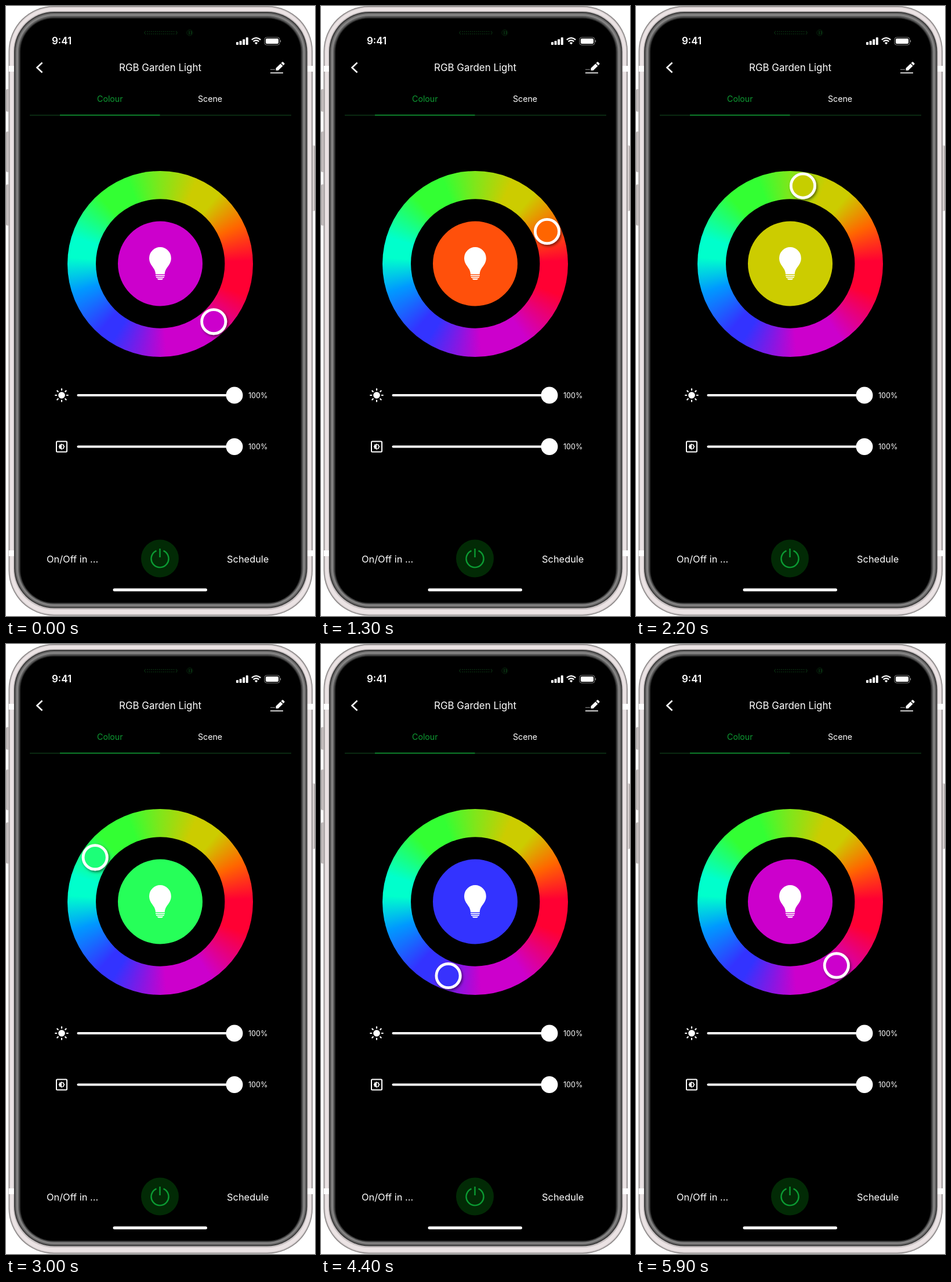
An HTML page for the animation above (6000 ms loop, 533 by 1050 pixels).

```html
<!DOCTYPE html>
<html lang="en">
<head>
<meta charset="utf-8">
<title>Light control</title>
<style>
  html, body { margin: 0; width: 100%; height: 100%; overflow: hidden; background: #fff; }
  svg { display: block; width: 533px; height: 1050px; font-family: Inter, Roboto, sans-serif; }
  .wheel {
    width: 320px; height: 320px; border-radius: 50%;
    background: conic-gradient(#80e61a 0deg, #cc0 24deg, #cc0 40deg, #f60 64deg, #f03 88deg, #f03 110deg,
      #c0c 146deg, #c0c 176deg, #33f 212deg, #33f 222deg, #09f 252deg, #0fc 274deg, #0fc 287deg,
      #3f3 318deg, #3f3 339deg, #80e61a 360deg);
  }
</style>
</head>
<body>
<svg viewBox="0 0 533 1050" xmlns="http://www.w3.org/2000/svg">
  <defs>
    <filter id="shadow" x="-30%" y="-30%" width="170%" height="170%">
      <feDropShadow dx="2" dy="2.5" stdDeviation="2" flood-color="#000" flood-opacity=".5"/>
    </filter>
    <linearGradient id="button" x2="1" y2="0">
      <stop offset="0" stop-color="#8f8a8a"/><stop offset=".5" stop-color="#e6dfdf"/><stop offset="1" stop-color="#a8a2a2"/>
    </linearGradient>
  </defs>

  <g fill="url(#button)">
    <rect x="0.5" y="143" width="7" height="39" rx="2"/>
    <rect x="0.5" y="216" width="7" height="70" rx="2"/>
    <rect x="0.5" y="307" width="7" height="71" rx="2"/>
    <rect x="526" y="240" width="7" height="113" rx="2"/>
  </g>
  <g id="body"></g>
  <g fill="#fff">
    <rect x="5" y="103" width="8.5" height="10"/><rect x="520.5" y="103" width="8.5" height="10"/>
    <rect x="5" y="937" width="8.5" height="10"/><rect x="520.5" y="937" width="8.5" height="10"/>
  </g>

  <g fill="none" stroke="#0d3f17">
    <path d="M241 43Q237 46 241 49M293 43Q297 46 293 49"/>
    <path d="M243 44H291M243 48H291" stroke-dasharray="2 1.5"/>
    <circle cx="317" cy="46" r="5" stroke="#08290d"/>
    <path d="M316 43V49M319 43Q321 46 319 49" stroke="#105a20"/>
  </g>

  <g fill="#fff">
    <text x="79" y="66.3" font-size="17" font-weight="600">9:41</text>
    <rect x="397" y="62" width="4" height="5" rx="1"/>
    <rect x="402.6" y="60" width="4" height="7" rx="1"/>
    <rect x="408.2" y="57.3" width="4" height="9.7" rx="1"/>
    <rect x="413.8" y="54" width="4" height="13" rx="1"/>
    <rect x="448" y="56" width="22" height="9" rx="2"/>
    <path d="M473 58.5Q475.5 60.5 473 62.5Z" opacity=".6"/>
    <path d="M428.8 63.4Q431.5 61.3 434.2 63.4L431.5 66.2Z"/>
  </g>
  <rect x="446" y="54" width="26" height="13" rx="3.5" fill="none" stroke="#8a8a8a"/>
  <g fill="none" stroke="#fff" stroke-width="2.2">
    <path d="M423.8 58.2Q431.5 51.5 439.2 58.2M426.6 61.2Q431.5 57 436.4 61.2"/>
    <path d="M62.5 97.5L53.5 106L62.5 114.5" stroke-width="2.6"/>
    <path d="M456 115.2H478" stroke-width="1.6"/>
    <path d="M456 109.3H464" stroke="#999" stroke-width="1"/>
  </g>
  <path d="M465.5 111V107L473.5 99.2L477.5 103.2L469.5 111ZM474.5 98.2L476.4 96.4Q477.2 95.6 478 96.4L480.3 98.7Q481 99.5 480.3 100.3L478.5 102.2Z" fill="#fff"/>

  <text x="266" y="112.2" font-size="16.9" text-anchor="middle" fill="#fff">RGB Garden Light</text>
  <text x="179.3" y="164.8" font-size="14.2" text-anchor="middle" fill="#0e9c33">Colour</text>
  <text x="352" y="164.8" font-size="14.2" text-anchor="middle" fill="#fff">Scene</text>
  <path d="M41 188H492" stroke="#145222"/>
  <path d="M93 187.7H265.5" stroke="#0f9a33" stroke-width="1.6"/>

  <foreignObject x="106.2" y="283.5" width="320" height="320"><div xmlns="http://www.w3.org/1999/xhtml" class="wheel"></div></foreignObject>
  <circle cx="266.2" cy="443.5" r="111.2"/>
  <circle id="lamp" cx="266" cy="443.5" r="73"/>
  <g fill="#fff">
    <path d="M258 461.8C257.5 449.5 247 447 247 434A18.9 18.9 0 0 1 284.8 434C284.8 447 274.3 449.5 273.8 461.8Z"/>
    <path d="M258 463.2H273.8V465H258ZM258.6 466.2H273.2L272.4 468H259.4ZM260.6 469.1H271.2L269.2 471.2H262.6Z"/>
  </g>
  <circle id="handle" r="20.6" stroke="#fff" stroke-width="4.8" filter="url(#shadow)"/>

  <g id="sliders" fill="#fff"></g>
  <g id="icons" fill="none" stroke="#fff" stroke-linecap="round"></g>
  <rect x="87" y="749.5" width="18" height="18" rx="1.5" fill="none" stroke="#fff" stroke-width="2"/>
  <path d="M96 753.2L98 754.7H100V756.6L101.4 758.5L100 760.4V762.3H98L96 763.8L94 762.3H92V760.4L90.6 758.5L92 756.6V754.7H94Z" fill="#fff"/>
  <path d="M96 755.4A3.1 3.1 0 0 1 96 761.6Z" fill="#000"/>

  <g font-size="16.4" fill="#fff">
    <text x="70" y="958">On/Off in ...</text>
    <text x="381" y="958">Schedule</text>
  </g>
  <circle cx="265.5" cy="951" r="32.5" fill="#022a05"/>
  <path d="M259.5 937.6A15 15 0 1 0 271.5 937.6M265.5 934V949" fill="none" stroke="#0b9a32" stroke-width="2.4"/>
  <rect x="184.5" y="1002.5" width="162.5" height="5" rx="2.5" fill="#fff"/>
</svg>

<script>
  const LOOP = 6000, STEP = 100;
  const $ = id => document.getElementById(id);

  function add(parent, tag, attrs, text) {
    const el = document.createElementNS("http://www.w3.org/2000/svg", tag);
    for (const k in attrs) el.setAttribute(k, attrs[k]);
    if (text) el.textContent = text;
    $(parent).append(el);
  }

  // Phone shell, outside in: side inset, top, bottom, radius, colour
  [[4.5, 0, 1049.5, 78, "#8d8989"], [6, 1.5, 1048, 77, "#d3cccd"], [7.5, 3, 1046.5, 75, "#ebe3e4"],
   [12.5, 8.5, 1039, 70, "#c9c2c3"], [14, 10, 1036.5, 69, "#3a3a3a"], [16, 12, 1034.5, 67, "#6a6969"],
   [18, 14, 1032.5, 65, "#858484"], [21, 17, 1030, 62, "#5a5a5a"], [23, 19.5, 1028.5, 60, "#2a2a2a"],
   [25, 21.5, 1027, 57, "#000"]]
    .forEach(([x, y, bottom, rx, fill]) =>
      add("body", "rect", { x, y, width: 533.5 - 2 * x, height: bottom - y, rx, fill }));

  for (const y of [670, 758.5]) {
    add("sliders", "rect", { x: 122.5, y: y - 2, width: 272, height: 4, rx: 2 });
    add("sliders", "circle", { cx: 394, cy: y, r: 14.5 });
    add("sliders", "text", { x: 418, y: y + 4.8, "font-size": 12.6 }, "100%");
  }

  add("icons", "circle", { cx: 96, cy: 670, r: 5.8, fill: "#fff", stroke: "none" });
  for (let i = 0; i < 8; i++)
    add("icons", "path", { d: "M8.8 0H10.8", "stroke-width": 2.2, transform: `translate(96 670) rotate(${i * 45})` });

  // Handle travel: time in ms, degrees turned, speed in degrees per second
  const travel = [[0, 0, 51], [1300, 71.3, 58], [2200, 127.9, 72], [3000, 193, 81],
                  [4400, 297.2, 59], [5200, 334.2, 36], [5900, 353.2, 20]];

  const tints = [[0, 204, 0, 204], [200, 204, 0, 204], [850, 255, 0, 51], [1425, 255, 102, 0],
                 [2000, 204, 204, 0], [2300, 204, 204, 0], [2850, 51, 255, 51], [3450, 0, 255, 204],
                 [3850, 0, 153, 255], [4250, 51, 51, 255], [4500, 51, 51, 255], [5100, 204, 0, 204],
                 [6200, 204, 0, 204]];

  function span(keys, t) {
    let i = 0;
    while (i < keys.length - 2 && t >= keys[i + 1][0]) i++;
    const a = keys[i], b = keys[i + 1];
    return [a, b, (t - a[0]) / (b[0] - a[0])];
  }

  function turned(t) {
    const [a, b, u] = span(travel, t), d = (b[0] - a[0]) / 1000, v = 1 - u;
    return v * v * ((1 + 2 * u) * a[1] + u * d * a[2]) + u * u * ((3 - 2 * u) * b[1] - v * d * b[2]);
  }

  function tint(t) {
    const [a, b, u] = span(tints, t);
    return `rgb(${[1, 2, 3].map(k => Math.round(a[k] + (b[k] - a[k]) * u))})`;
  }

  function draw(ms) {
    const t = Math.floor((ms % LOOP) / STEP) * STEP;
    const angle = (47.2 - turned(t)) * Math.PI / 180;
    $("handle").setAttribute("cx", 266 + 135.8 * Math.cos(angle));
    $("handle").setAttribute("cy", 443.5 + 135.8 * Math.sin(angle));
    $("handle").setAttribute("fill", tint(t + 120));
    $("lamp").setAttribute("fill", tint(t));
  }

  let start;
  function tick(now) {
    start ??= now;
    draw(Math.max(0, now - start));
    requestAnimationFrame(tick);
  }
  draw(0);
  requestAnimationFrame(tick);
</script>
</body>
</html>
```
